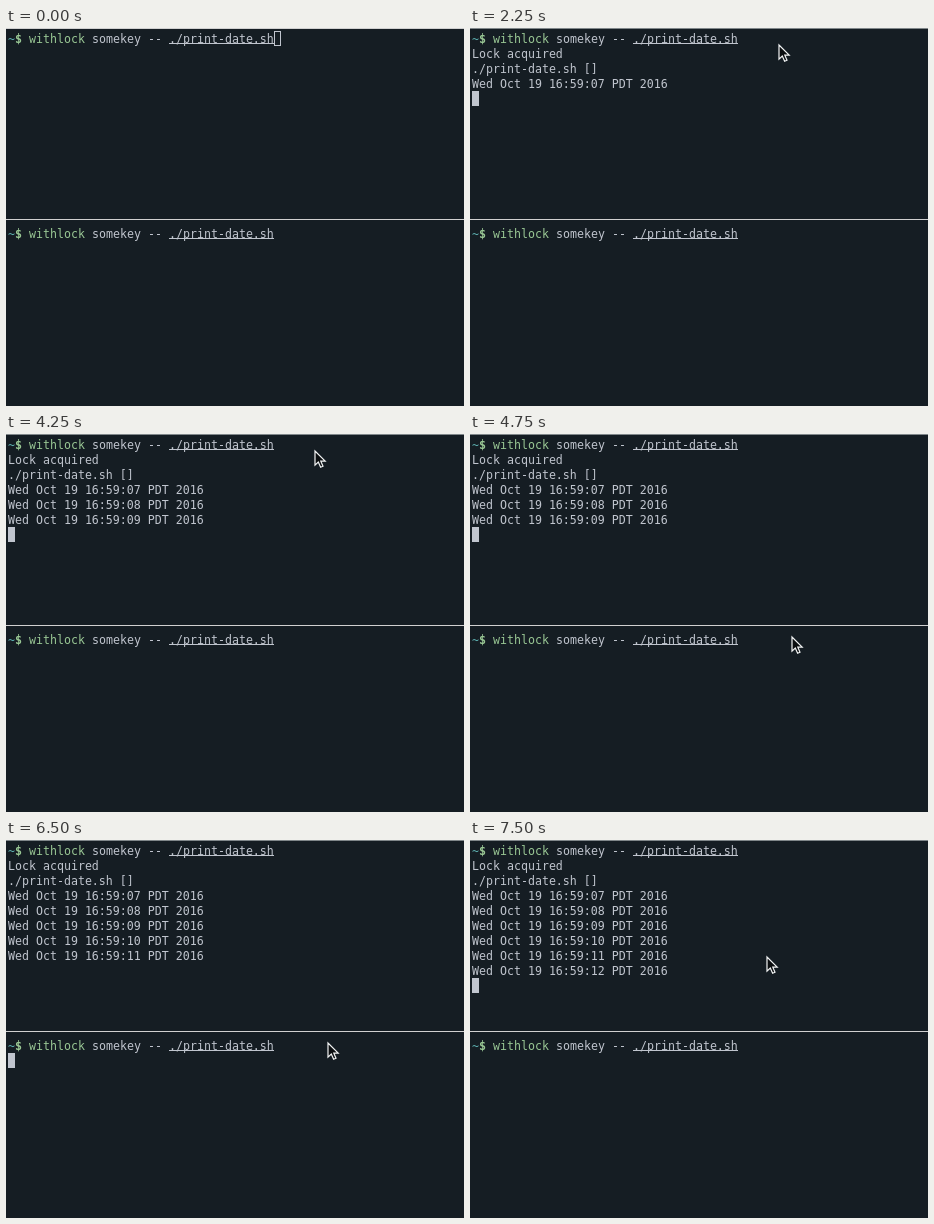
An HTML page that plays this animation: 458 px wide and 378 px high, repeating every 8000 ms.

```html
<!DOCTYPE html>
<html lang="en">
<head>
<meta charset="utf-8">
<title>Two terminals sharing a lock</title>
<style>
  html, body { margin: 0; width: 100%; height: 100%; overflow: hidden; background: #151d23; }
  svg { display: block; }
  /* this size gives the font an advance of exactly 7px */
  text { font: 11.627px "DejaVu Sans Mono", "Liberation Mono", monospace; fill: #c0c5ce; white-space: pre; }
  .tilde { fill: #5fb3b3; }
  .dollar { fill: #99c794; font-weight: bold; }
  .command { fill: #99c794; }
</style>
</head>
<body>
<svg id="stage" width="458" height="378" viewBox="0 0 458 378">
  <rect width="458" height="378" fill="#151d23"/>
  <rect id="edge" width="458" height="1"/>
  <rect y="191" width="458" height="1" fill="#d0d0d0"/>
</svg>
<script>
const LOOP = 8000, CELL = 7, LINE = 15, LEFT = 2, BASELINE = 12;
const TOP = 3, BOTTOM = 198, PROMPT_END = 38;
const FOCUS_AT = 750, INK = "#c0c5ce";
const stage = document.getElementById("stage");
const edge = document.getElementById("edge");

function add(tag, attrs) {
  const el = document.createElementNS("http://www.w3.org/2000/svg", tag);
  for (const key in attrs) el.setAttribute(key, attrs[key]);
  stage.appendChild(el);
  return el;
}

function write(pane, row, col, string, cls = "") {
  const el = add("text", { x: LEFT + col * CELL, y: pane + row * LINE + BASELINE, class: cls });
  el.textContent = string;
  return el;
}

function drawPrompt(pane) {
  write(pane, 0, 0, "~", "tilde");
  write(pane, 0, 1, "$", "dollar");
  write(pane, 0, 3, "withlock", "command");
  write(pane, 0, 12, "somekey --");
  write(pane, 0, 23, "./print-date.sh");
  add("rect", { x: LEFT + 23 * CELL, y: pane + BASELINE, width: 15 * CELL, height: 1, fill: INK });
}

drawPrompt(TOP);
drawPrompt(BOTTOM);

// When each output line of the upper pane appears
const output = [[2250, "Lock acquired"], [2250, "./print-date.sh []"]];
[2250, 3250, 4250, 5500, 6500, 7500].forEach((at, i) => {
  output.push([at, `Wed Oct 19 16:59:${String(7 + i).padStart(2, "0")} PDT 2016`]);
});
const lines = output.map(([at, string], i) => ({ at, el: write(TOP, i + 1, 0, string) }));

// time, pane, row, column
const caretSteps = [
  [0, TOP, 0, PROMPT_END],
  [2250, TOP, 4, 0],
  [3250, TOP, 5, 0],
  [4250, TOP, 6, 0],
  [5000, BOTTOM, 0, PROMPT_END],
  [6000, BOTTOM, 1, 0],
  [7500, TOP, 9, 0]
];

// time, x, y
const pointerSteps = [
  [0, -40, -40],
  [500, 307, 14],
  [750, 308, 16],
  [4500, 313, 157],
  [4750, 321, 202],
  [6750, 301, 168],
  [7000, 296, 116]
];

const solid = add("rect", { width: CELL, height: LINE, fill: INK });
const hollow = add("rect", {
  x: LEFT + PROMPT_END * CELL + 0.5, y: TOP + 0.5, width: CELL - 1, height: LINE - 1,
  fill: "none", stroke: INK
});
const pointer = add("path", {
  d: "M1 1V15.2L4.3 12.1L6.6 17.3L9 16.2L6.8 11.2H11.2Z",
  fill: "#0b0e10", stroke: "#f2f4f4", "stroke-width": 1.2
});

const current = (steps, t) => steps.filter(step => step[0] <= t).pop();
const show = (el, on) => el.setAttribute("visibility", on ? "visible" : "hidden");

function render(t) {
  for (const line of lines) show(line.el, t >= line.at);
  const [, pane, row, col] = current(caretSteps, t);
  solid.setAttribute("x", LEFT + col * CELL);
  solid.setAttribute("y", pane + row * LINE);
  const focused = t >= FOCUS_AT;
  show(solid, focused);
  show(hollow, !focused);
  edge.setAttribute("fill", focused ? "#80878a" : "#d0d0d0");
  const [, x, y] = current(pointerSteps, t);
  pointer.setAttribute("transform", `translate(${x} ${y})`);
}

const start = performance.now();
function tick() {
  render((performance.now() - start) % LOOP);
  requestAnimationFrame(tick);
}
tick();
</script>
</body>
</html>
```
